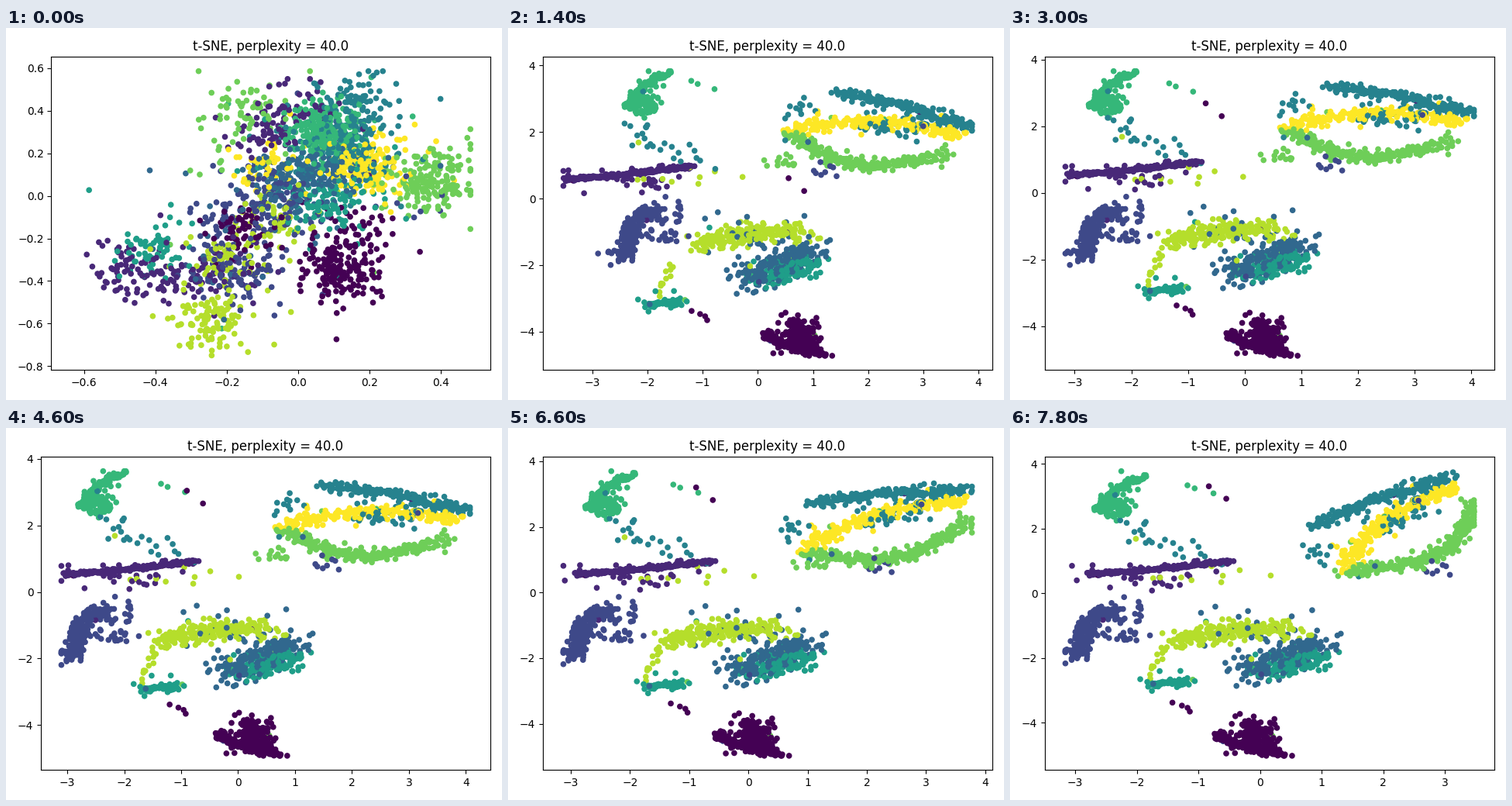
Animation of 640x480 px, one loop 8000 ms. Source, as a matplotlib script:

```python
import numpy as np
import matplotlib.pyplot as plt
from matplotlib.animation import FuncAnimation

STEP, FRAMES = 200, 40
GROWN, FORMED, TURNING, END = 400, 1400, 4600, 7800  # ms
PIVOT = 2.35 + 2j  # the right-hand group rotates around this

# Positions are complex numbers, x + yj
rng = np.random.default_rng(40)
parts, labels = [], []


def noise(n):
    return np.clip(rng.normal(size=n), -2.3, 2.3) \
        + 1j * np.clip(rng.normal(size=n), -2.3, 2.3)


def arc(p, q, bend=0.0):
    """Curve from p to q, bulging left by bend times its length."""
    return lambda u: p + (q - p) * (u + 4j * bend * u * (1 - u))


def cluster(label, n, starts, early, home, spread,
            lag=0, drift=0, spin=0):
    """Points that leave blobs for an early curve, then settle on home.

    lag is the offset still left when formed, drift the late movement.
    """
    u = (np.arange(n) + rng.random(n)) / n
    v = noise(n)
    first = rng.choice(starts, n) + 0.05 * v.real + 0.065j * v.imag
    first += (rng.random(n) < 0.1) * 0.1 * noise(n)
    blur = spread * v + (rng.random(n) < 0.08) * 0.22 * noise(n)
    const = [np.full(n, c) for c in (lag, drift, spin)]
    parts.append(np.array([first, early(u) + blur, home(u) + blur, *const]))
    labels.extend([label] * n)


def place(track, ms):
    """Positions of a track at a time in ms."""
    first, early, home, lag, drift, spin = track
    late = max(0, (ms - TURNING) / (END - TURNING)) ** 1.5
    rest = np.exp(-max(0, ms - FORMED) / 900)
    turn = np.radians(51 * late - 7 * rest)
    home = home + spin * (home - PIVOT) * (np.exp(1j * turn) - 1)
    home = home + lag * rest + drift * late
    if ms < GROWN:
        return first + (early - first) * ms / GROWN
    s = min(1, (ms - GROWN) / (FORMED - GROWN))
    return home + (early - home) * (1 - s) ** 2


# 0: triangle at the bottom, plus a few that wander
zero = [.12 - .38j, .1 - .35j, .15 - .2j, -.16 - .15j]
fall = dict(lag=.5 + .2j, drift=-.33 - .1j)
cluster(0, 130, zero, arc(.55 - 3.38j, 1.6 - 3.4j, -.08),
        arc(-.4 - 4.2j, .72 - 4.9j, -.08), .06, **fall)
cluster(0, 130, zero, arc(1.05 - 3.4j, .85 - 2.8j),
        arc(.25 - 4.65j, .22 - 3.95j), .16, **fall)
cluster(0, 4, zero, arc(-1.1 - 2.2j, -.5 - 2.5j),
        arc(-1.2 - 3.4j, -.8 - 3.65j), .04, drift=-.22)
cluster(0, 2, zero, arc(1.7 + .3j, 1.82 + .6j),
        arc(-.7 + 2.8j, -.63 + 2.63j), .02, lag=1.5 - 2.5j, drift=.11 + .2j)

# 1: long thin line on the left
cluster(1, 235, [-.5 - .36j, -.38 - .39j, -.22 - .36j, -.09 + .3j, 0 + .4j],
        arc(-3.17 - .3j, -2.1 + 1.22j, -.04),
        arc(-3.06 + .52j, -.73 + .93j, -.02), .028,
        lag=-.47 + .05j, drift=.25 + .07j)
cluster(1, 18, [-.3 - .38j], arc(-2.6, -2 + .7j), arc(-2.2 + .45j, -1.5 + .4j),
        .17, lag=-.2 + .1j, drift=.15)

# 2: hook on the left
two = [-.2 - .34j, -.15 - .37j, -.12 + .04j, -.2 - .1j, -.05 - .05j]
hook = dict(lag=.5 + .2j, drift=-.03 + .03j)
cluster(2, 105, two, arc(-1.8 - .2j, -1.2 - .45j, -.15),
        arc(-2.3 - .55j, -2.85 - 1.2j, -.12), .1, **hook)
cluster(2, 105, two, arc(-1.43 - 1.7j, -1.43 - 2.45j),
        arc(-2.83 - 1.2j, -2.98 - 2j), .085, **hook)
cluster(2, 35, two, arc(-1.7 + .3j, -1.3 - .9j),
        arc(-2.1 - .5j, -2.2 - 1.4j), .2, **hook)
cluster(2, 8, [.3 - .05j], arc(.1 + .45j, .9 + .55j),
        arc(1.45 + .9j, 1.7 + .7j), .1, lag=-.35, drift=1.3 - .1j)

# 3 and 5: mixed cloud in the middle, and a small teal tail
cluster(3, 225, [.02 + .1j, .08 + .12j, -.04 + .02j],
        arc(-.35 - 1.95j, .95 - 1.1j, -.03),
        arc(-.25 - 2.45j, .95 - 1.45j, -.05), .19)
cluster(3, 18, two, arc(-.9 + .2j, .8 - .5j), arc(-.9 - 1.6j, .6 - .7j), .4)
cluster(5, 125, [.1 - .05j, .14 + .05j, .03 - .02j],
        arc(.3 - 1.4j, .95 - 1.5j), arc(.2 - 2.35j, .95 - 1.9j), .19)
cluster(5, 65, [-.42 - .25j], arc(-2.08 - 1.28j, -1.35 - 1.33j),
        arc(-1.65 - 2.9j, -1.02 - 2.78j, -.06), .055,
        lag=-.35 - .28j, drift=-.12 + .1j)

# 6: arc at the upper left with a blob and a loose trail below
rise = dict(lag=.4 + .2j, drift=.13 + .02j)
cluster(6, 155, [.08 + .3j], arc(-1.15 + 2.65j, .48 + 3.28j, .12),
        arc(-2.73 + 2.5j, -2 + 3.58j, .12), .04, **rise)
cluster(6, 85, [.1 + .28j, .05 + .34j], arc(-1.1 + 2.75j, -.4 + 3.2j),
        arc(-2.48 + 2.4j, -2.5 + 2.85j), .12, **rise)
cluster(6, 3, [.05 + .3j], arc(.85 + 2.9j, 1.4 + 2.45j),
        arc(-1.45 + 3.28j, -.75 + 2.9j), .02, lag=.15 + .3j, drift=.18 + .1j)
cluster(4, 24, [.1j], arc(-1.7 + 1.6j, -.6 + 2.9j),
        arc(-2.6 + 2.2j, -1 + 1.1j), .18, drift=.15)

# 4, 9 and 7: three bands that rotate together
swing = dict(lag=-.2 - .1j, spin=1)
cluster(4, 175, [.15 + .28j, .17 + .36j, .1 + .2j, .16 + .48j],
        arc(.6 + 1.88j, 2.98 + 1.75j, .03),
        arc(1.5 + 3.2j, 4.05 + 2.4j, .05), .09, **swing)
cluster(4, 55, [.15 + .2j], arc(1.3 + 1.5j, 2.5 + 1.6j),
        arc(2.1 + 2.3j, 3.4 + 2.4j), .17, **swing)
cluster(4, 10, [.1 + .4j], arc(-.8 + 1j, -.3 + 1j),
        arc(.7 + 2.3j, .95 + 2.95j), .1, **swing)
cluster(9, 235, [.2 + .2j, .17 + .12j, .2 + .1j, .17 + .16j, -.08 + .14j],
        arc(-.05 + 1j, 2.85 + 1.52j, .02),
        arc(.8 + 2j, 3.85 + 2.2j, .1), .1, **swing)
cluster(7, 235, [.4 + .07j, .35 + .04j, .36 + .1j, -.15 + .41j],
        arc(.15 + .95j, 3 + 1.7j, -.17),
        arc(.8 + 1.9j, 3.65 + 1.65j, -.24), .085, **swing)
cluster(7, 13, [-.25 + .25j], arc(-1.1 + .6j, .2 + .8j),
        arc(.3 + 1j, .95 + 1.2j), .08, lag=-.2, drift=.9 - .45j)

# 8: lime band across the middle
lime = [-.24 - .6j, -.25 - .56j, -.2 - .3j, -.06 - .1j]
cluster(8, 210, lime, arc(-1.55 - 1.4j, .9 - .88j, .04),
        arc(-1.4 - 1.55j, .55 - 1.2j, .13), .14, lag=.3 + .1j)
cluster(8, 11, lime, arc(-1.7 - 1.5j, -.9 - 1.4j),
        arc(-1.72 - 2.75j, -1.4 - 1.7j), .06, lag=-.1 - .2j, drift=-.1 + .1j)
cluster(8, 9, lime, arc(-2.2 + .3j, -.5 + .7j),
        arc(-2 + .3j, -.2 + .5j, .05), .15, lag=-.3 + .2j, drift=.15 + .1j)

points = np.concatenate(parts, axis=1)
order = rng.permutation(points.shape[1])
points, labels = points[:, order], np.array(labels)[order]
odd = rng.random(len(labels)) < 0.02
labels[odd] = rng.integers(0, 10, odd.sum())

# Lower and upper corner of the axes move by the same rule as the points
low = (-.692 - .818j, -3.482 - 3.872j, -3.449 - 5.352j,
       -.45 + .196j, -.04 - .113j, 0)
high = (.539 + .653j, 3.341 + 3.684j, 4.435 + 4.047j,
        -.18 + .21j, -.635 + .169j, 0)

fig, ax = plt.subplots(figsize=(6.4, 4.8), dpi=100)
dots = ax.scatter(labels, labels, 20, labels, cmap="viridis")
ax.set_title("t-SNE, perplexity = 40.0")


def update(i):
    ms = i * STEP
    lo, hi = place(low, ms), place(high, ms)
    z, pad = place(points, ms), (hi - lo) / 22
    dots.set_offsets(np.column_stack([
        np.clip(z.real, (lo + pad).real, (hi - pad).real),
        np.clip(z.imag, (lo + pad).imag, (hi - pad).imag)]))
    ax.set_xlim(lo.real, hi.real)
    ax.set_ylim(lo.imag, hi.imag)
    fig.subplots_adjust(left=0.07, right=0.977, bottom=0.08, top=0.92)
    fig.tight_layout()
    return (dots,)


anim = FuncAnimation(fig, update, frames=FRAMES, interval=STEP,
                     init_func=lambda: update(0), repeat=True,
                     repeat_delay=0, blit=False)
plt.show()
```
